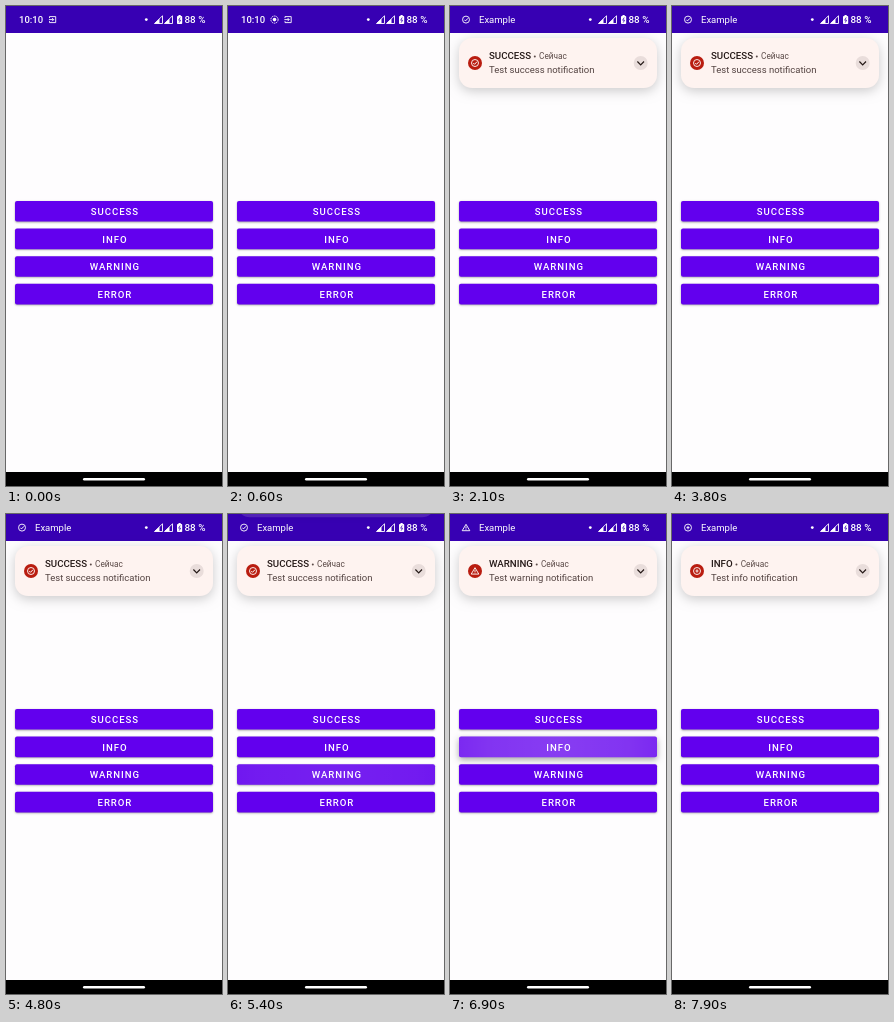
An HTML page with a canvas for the animation above (8 s loop, 216 by 480 pixels).

```html
<!DOCTYPE html>
<html lang="en">
<head>
<meta charset="utf-8">
<title>Notification demo</title>
<style>
html, body { margin: 0; width: 100%; height: 100%; overflow: hidden; background: #fefdfe; }
canvas { display: block; width: 216px; height: 480px; }
</style>
</head>
<body>
<canvas id="stage"></canvas>
<script>
const LOOP = 8000, TAU = Math.PI * 2;
const canvas = document.getElementById('stage');
const c = canvas.getContext('2d');
const dpr = window.devicePixelRatio || 1;
canvas.width = 216 * dpr;
canvas.height = 480 * dpr;

const BUTTONS = ['SUCCESS', 'INFO', 'WARNING', 'ERROR'];
const NOTICES = [
  { kind: 'SUCCESS', press: 1100 },
  { kind: 'WARNING', press: 4900 },
  { kind: 'INFO', press: 6700 }
].map(n => ({ ...n, show: n.press + 480 }));

const clamp = v => Math.min(1, Math.max(0, v));
const span = (t, from, length) => clamp((t - from) / length);
const easeOut = p => 1 - (1 - p) ** 3;
const easeInOut = p => p * p * (3 - 2 * p);

function text(str, x, y, size, color, weight = 400, spacing = 0, align = 'left') {
  c.font = `${weight} ${size}px Roboto, sans-serif`;
  c.letterSpacing = spacing + 'px';
  c.textAlign = align;
  c.fillStyle = color;
  c.fillText(str, x, y);
  return x + c.measureText(str).width;
}

function disc(x, y, r, color) {
  c.fillStyle = color;
  c.beginPath();
  c.arc(x, y, r, 0, TAU);
  c.fill();
}

function box(x, y, w, h, r, color) {
  c.fillStyle = color;
  c.beginPath();
  c.roundRect(x, y, w, h, r);
  c.fill();
}

function line(points, width = 1, color = '#fff', close = false) {
  c.strokeStyle = color;
  c.lineWidth = width;
  c.beginPath();
  points.forEach(([x, y]) => c.lineTo(x, y));
  if (close) c.closePath();
  c.stroke();
}

function ring(x, y, r, width = 0.9) {
  c.strokeStyle = '#fff';
  c.lineWidth = width;
  c.beginPath();
  c.arc(x, y, r, 0, TAU);
  c.stroke();
}

function shadow(blur, dy, alpha) {
  c.shadowColor = `rgba(0,0,0,${alpha})`;
  c.shadowBlur = blur * dpr;
  c.shadowOffsetY = dy * dpr;
}

// Draws at a local origin, with its own opacity and scale
function at(x, y, alpha, draw, scale = 1) {
  if (alpha <= 0 || scale <= 0) return;
  c.save();
  c.globalAlpha *= alpha;
  c.translate(x, y);
  c.scale(scale, scale);
  draw();
  c.restore();
}

const ICONS = {
  SUCCESS() {
    ring(0, 0, 3.5);
    line([[-1.7, 0.1], [-0.5, 1.3], [2, -1.3]]);
  },
  WARNING() {
    line([[0, -3.3], [3.8, 3.1], [-3.8, 3.1]], 0.9, '#fff', true);
    line([[0, -1.1], [0, 1]], 0.9);
    line([[0, 1.6], [0, 2.3]], 0.9);
  },
  INFO() {
    ring(0, 0, 3.5);
    line([[0, -1.7], [0, 1.7]], 0.9);
    line([[-1.5, 0], [1.5, 0]], 0.9);
  }
};

function recordIcon() {
  c.setLineDash([1.6, 0.7]);
  ring(0, 0, 3.6, 0.9);
  c.setLineDash([]);
  disc(0, 0, 1.8, '#fff');
}

function exitIcon() {
  line([[-3, -1.5], [-3, -3], [3.2, -3], [3.2, 3], [-3, 3], [-3, 1.5]], 0.9);
  line([[-3.6, 0], [1.2, 0]], 0.9);
  line([[-0.4, -1.6], [1.2, 0], [-0.4, 1.6]], 0.9);
}

function signal(x) {
  line([[x, 17.5], [x + 8, 17.5], [x + 8, 9.8]], 0.9, '#fff', true);
  c.fillStyle = '#fff';
  c.beginPath();
  c.moveTo(x, 17.5);
  c.lineTo(x + 5, 17.5);
  c.lineTo(x + 5, 12.7);
  c.fill();
}

function statusBar(t) {
  c.fillStyle = '#3700b3';
  c.fillRect(0, 0, 216, 27);

  const first = NOTICES[0].show;
  at(0, 0, 1 - span(t, first, 150), () => {
    const rec = easeInOut(span(t, 250, 350));
    text('10:10', 13, 17, 9.5, '#fff', 500);
    at(46.5, 13.6, rec, recordIcon, rec);
    at(46.5 + 13.5 * rec, 13.6, 1, exitIcon);
  });

  at(0, 0, span(t, first + 120, 180), () => {
    NOTICES.forEach((n, i) => {
      const next = NOTICES[i + 1];
      const fadeOut = next ? span(t, next.show + 50, 100) : 0;
      const fadeIn = i ? span(t, n.show + 130, 120) : 1;
      at(16, 13.6, fadeIn * (1 - fadeOut), ICONS[n.kind]);
    });
    text('Example', 29, 17, 9.5, '#fff');
  });

  disc(140.3, 13.6, 1.4, '#fff');
  signal(148.5);
  signal(158.5);
  box(171, 10, 5.2, 8, 0.8, '#fff');
  box(172.5, 9, 2.2, 2, 0, '#fff');
  line([[174.2, 11.5], [172.7, 14.2], [174.6, 14.2], [173.2, 16.6]], 0.8, '#3700b3');
  text('88 %', 178.5, 17, 9.9, '#fff', 500);
}

function button(label, i, t) {
  const y = 195 + 27.6 * i;
  const tap = NOTICES.find(n => n.kind === label);
  const age = tap ? t - tap.press : -1;
  const lift = age < 0 ? 0 : span(age, 60, 100) * (1 - span(age, 220, 80));

  c.save();
  shadow(2 + 4 * lift, 0.8 + 1.7 * lift, 0.35);
  box(9, y, 198, 20.6, 2, '#6200ee');
  c.restore();

  if (age >= 0 && age < 750) {
    const r = 30 + 170 * easeOut(span(age, 0, 420));
    const alpha = 0.24 * span(age, 0, 80) * (1 - 0.85 * span(age, 220, 500)) * (1 - span(age, 650, 100));
    const glow = c.createRadialGradient(108, y + 10, 0, 108, y + 10, r);
    glow.addColorStop(0, `rgba(255,255,255,${alpha})`);
    glow.addColorStop(0.4, `rgba(255,255,255,${alpha * 0.85})`);
    glow.addColorStop(1, `rgba(255,255,255,${alpha * 0.2})`);
    box(9, y, 198, 20.6, 2, glow);
  }
  text(label, 108.9, y + 13.9, 9.6, '#fff', 500, 0.95, 'center');
}

function card(notice, t) {
  const p = easeOut(span(t, notice.show, 480));
  at(0, -90 * (1 - p), span(t, notice.show, 150), () => {
    c.save();
    shadow(12, 3, 0.2);
    box(9, 32, 198, 50, 13, '#fef3f0');
    c.restore();

    disc(25, 57, 7, '#b91d10');
    at(25, 57, 1, ICONS[notice.kind]);

    const end = text(notice.kind, 39, 53.4, 9.7, '#251917', 500);
    disc(end + 3.8, 50.4, 1, '#5b4a47');
    text('Сейчас', end + 8, 53.4, 8.3, '#5b4a47');
    text('Test ' + notice.kind.toLowerCase() + ' notification', 39, 67.3, 9.5, '#534341');

    disc(190.7, 57, 7, '#e9dddb');
    line([[187.4, 55.5], [190.7, 58.8], [194, 55.5]], 1.2, '#251917');
  });
}

function draw(t) {
  c.setTransform(dpr, 0, 0, dpr, 0, 0);
  c.fillStyle = '#fefdfe';
  c.fillRect(0, 0, 216, 480);
  BUTTONS.forEach((label, i) => button(label, i, t));
  c.fillStyle = '#000';
  c.fillRect(0, 466, 216, 14);
  box(77, 472, 62, 2.4, 1.2, '#fff');
  statusBar(t);

  NOTICES.forEach((n, i) => {
    const next = NOTICES[i + 1];
    const covered = next && t >= next.show + 480;
    if (t >= n.show && !covered) card(n, t);
  });
}

const start = performance.now();
function frame() {
  draw((performance.now() - start) % LOOP);
  requestAnimationFrame(frame);
}
frame();
</script>
</body>
</html>
```
